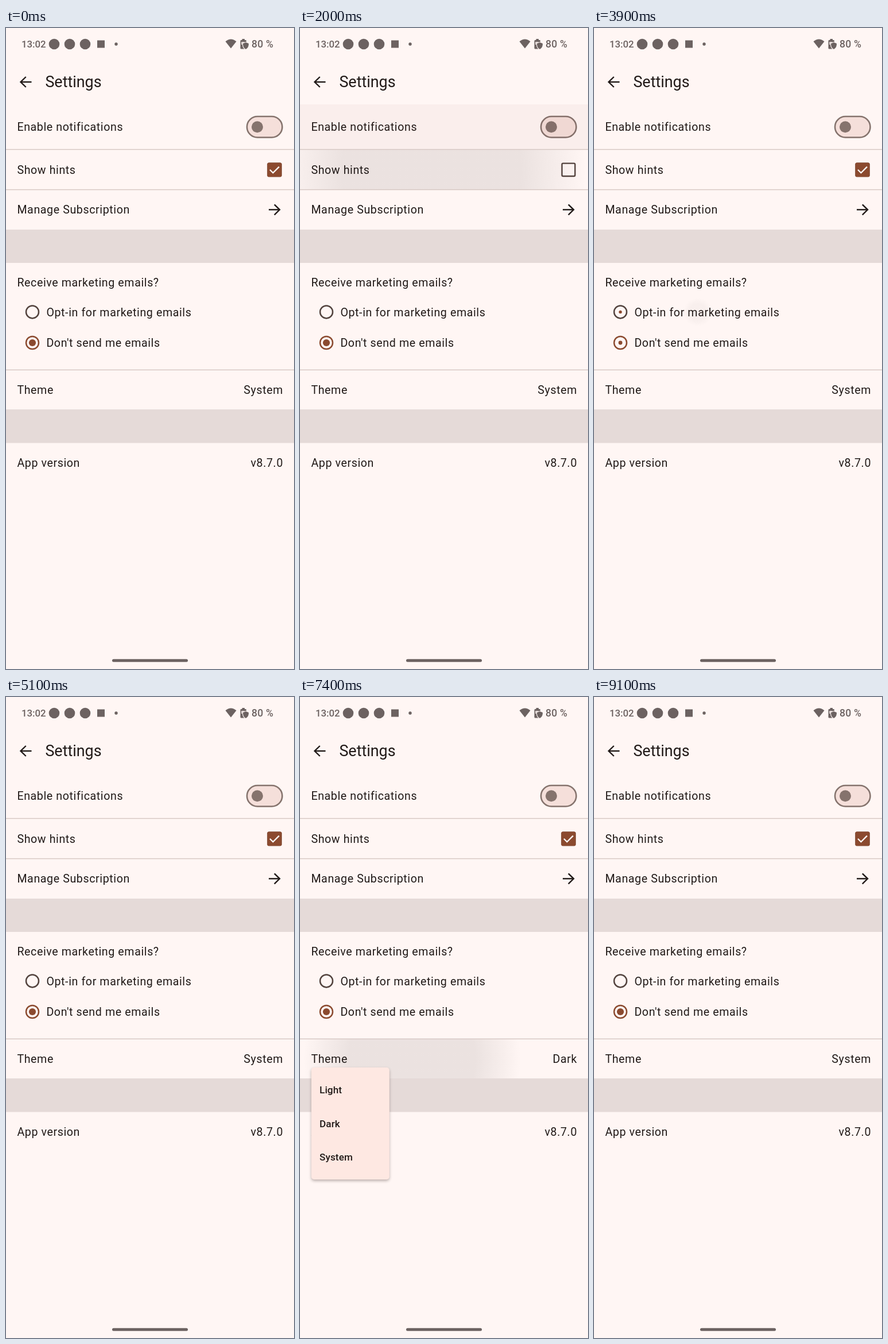
Write an HTML page with a canvas that moves like this. It is 502x1116 px and loops after 9200 ms.

```html
<!DOCTYPE html>
<html lang="en">
<head>
<meta charset="utf-8">
<title>Settings</title>
<style>
  html, body { margin: 0; width: 100%; height: 100%; overflow: hidden; background: #fff6f4; }
  canvas { display: block; width: 502px; height: 1116px; }
</style>
</head>
<body>
<canvas id="stage" width="502" height="1116"></canvas>
<script>
const ctx = document.getElementById('stage').getContext('2d');
const LOOP = 9200, STEP = 100, W = 502;
const BG = '#fff6f4', INK = '#211a18', PRIMARY = '#8b4a2f', OUTLINE = '#85736d',
      MUTED = '#53433e', STATUS = '#6c6261', BAND = '#e5dad8', LINE = '#d5c6c2';

// Rows as [top, height]
const ROW = {
  notify: [133, 78], hints: [212, 69], manage: [282, 69],
  optIn: [468, 53], optOut: [521, 53], theme: [596, 68]
};

// Touch ripples; "hold" freezes the spread at that age until "end"
const ripples = [
  { row: 'notify', start: 630, x: 150, end: 1000 },
  { row: 'notify', start: 1130, x: 150, end: 1600 },
  { row: 'hints', start: 1730, x: 130, end: 2200 },
  { row: 'hints', start: 2330, x: 130, end: 2800 },
  { row: 'manage', start: 2830, x: 130, end: 3300 },
  { row: 'optIn', start: 3875, x: 175, end: 4200 },
  { row: 'optOut', start: 4230, x: 175, end: 4700 },
  { row: 'theme', start: 5125, x: 120, end: 5600, hold: 190 },
  { row: 'theme', start: 6225, x: 120, end: 6700, hold: 190 },
  { row: 'theme', start: 7210, x: 120, end: 7700, hold: 290 },
  { row: 'theme', start: 8325, x: 120, end: 8700, hold: 190 }
];

// Menu visits as [open, close]
const menus = [[5200, 5800], [6300, 6600], [7300, 7700], [8400, 8700]];

const clamp = v => Math.max(0, Math.min(1, v));
const mix = (a, b, p) => a + (b - a) * p;
const ease = p => p * p * (3 - 2 * p);
const ramp = (t, from, len) => ease(clamp((t - from) / len));
// Rises shortly before "on" and falls shortly before "off"
const pulse = (t, on, off) => ramp(t, on - 60, 130) - ramp(t, off - 60, 130);

function text(str, x, y, o = {}) {
  ctx.font = `${o.weight || 400} ${o.size || 19.6}px Roboto, sans-serif`;
  ctx.letterSpacing = (o.gap ?? 0.61) + 'px';
  ctx.textAlign = o.align || 'left';
  ctx.fillStyle = o.color || INK;
  ctx.fillText(str, x, y);
}

function rect(x, y, w, h, color) {
  ctx.fillStyle = color;
  ctx.fillRect(x, y, w, h);
}

function round(x, y, w, h, r) {
  ctx.beginPath();
  ctx.roundRect(x, y, w, h, r);
}

function disc(x, y, r, color) {
  ctx.beginPath();
  ctx.arc(x, y, r, 0, Math.PI * 2);
  ctx.fillStyle = color;
  ctx.fill();
}

function stroke(points, color, width) {
  ctx.beginPath();
  points.forEach(([x, y]) => ctx.lineTo(x, y));
  ctx.strokeStyle = color;
  ctx.lineWidth = width;
  ctx.stroke();
}

function arrow(tip, y, dir) {
  stroke([[tip - dir * 1.5, y], [tip - dir * 19, y]], INK, 2.4);
  stroke([[tip - dir * 9.2, y - 9], [tip, y], [tip - dir * 9.2, y + 9]], INK, 2.4);
}

function statusBar() {
  text('13:02', 27, 33.5, { size: 16.8, weight: 500, gap: 0, color: STATUS });
  [84, 111, 138].forEach(x => disc(x, 28, 9.3, STATUS));
  rect(159, 21.5, 13, 13, STATUS);
  disc(192, 28, 2.7, STATUS);

  ctx.fillStyle = STATUS;
  ctx.beginPath();
  ctx.moveTo(392, 35.5);
  ctx.lineTo(382.5, 23.5);
  ctx.quadraticCurveTo(392, 15.5, 401.5, 23.5);
  ctx.fill();

  // Battery with a shield
  round(408.5, 21, 10.5, 15.5, 1.5);
  ctx.fill();
  rect(411.5, 19, 4.5, 3, STATUS);
  stroke([[411, 29], [411, 25], [415.5, 25]], BG, 1.4);
  ctx.beginPath();
  ctx.moveTo(418, 25);
  ctx.lineTo(423, 27);
  ctx.quadraticCurveTo(423.5, 34, 418, 37);
  ctx.quadraticCurveTo(412.5, 34, 413, 27);
  ctx.closePath();
  ctx.strokeStyle = BG;
  ctx.lineWidth = 2;
  ctx.stroke();
  ctx.fillStyle = STATUS;
  ctx.fill();

  text('80 %', 428, 33.5, { size: 17.6, weight: 500, gap: 0.2, color: STATUS });
}

function ripple(r, t) {
  if (t < r.start || t >= r.end) return;
  const age = Math.min(t - r.start, r.hold || 1e4);
  const [top, h] = ROW[r.row];
  const x = mix(r.x, W / 2, clamp(age / 330));
  const fade = r.hold ? 1 : 1 - ramp(age, 270, 190);
  const a = 0.09 * clamp(age / 75) * fade;
  const g = ctx.createRadialGradient(x, top + h / 2, 0, x, top + h / 2, age);
  g.addColorStop(0, `rgba(35,25,23,${a})`);
  g.addColorStop(0.58, `rgba(35,25,23,${a})`);
  g.addColorStop(1, 'rgba(35,25,23,0)');
  rect(0, top, W, h, g);
}

function toggle(p) {
  round(420, 154, 61.5, 36.5, 18.25);
  ctx.fillStyle = '#f5dfda';
  ctx.fill();
  ctx.strokeStyle = OUTLINE;
  ctx.lineWidth = 2.6;
  ctx.stroke();
  ctx.globalAlpha = p;
  round(418.7, 152.7, 64.1, 39.1, 19.5);
  ctx.fillStyle = PRIMARY;
  ctx.fill();
  ctx.globalAlpha = 1;
  disc(mix(438, 463, p), 172.2, mix(10, 14.6, p), p > 0.5 ? '#fff' : OUTLINE);
}

function checkbox(p) {
  round(456.6, 235.6, 22.8, 22.4, 2);
  ctx.strokeStyle = MUTED;
  ctx.lineWidth = 2.4;
  ctx.stroke();
  ctx.globalAlpha = p;
  round(455.4, 234.4, 25.2, 24.8, 2.8);
  ctx.fillStyle = PRIMARY;
  ctx.fill();
  stroke([[460, 246.8], [465.4, 252.2], [476, 241.6]], '#fff', 2.3);
  ctx.globalAlpha = 1;
}

function radio(y, p) {
  ctx.beginPath();
  ctx.arc(46, y, 11, 0, Math.PI * 2);
  ctx.strokeStyle = p > 0.5 ? PRIMARY : MUTED;
  ctx.lineWidth = 2.5;
  ctx.stroke();
  if (p > 0) disc(46, y, 6.1 * p, PRIMARY);
}

function menu(t) {
  const visit = menus.find(([open, close]) => t >= open && t <= close);
  if (!visit) return;
  const scale = mix(0.975, 1, clamp((t - visit[0]) / 100));
  ctx.save();
  ctx.globalAlpha = t === visit[1] ? 0.5 : 1;
  ctx.translate(87.8, 645);
  ctx.scale(scale, scale);
  ctx.translate(-87.8, -645);
  ctx.shadowColor = 'rgba(60,40,35,.35)';
  ctx.shadowBlur = 5;
  ctx.shadowOffsetY = 2.5;
  round(19.8, 645, 136, 195, 4.8);
  ctx.fillStyle = '#fee8e2';
  ctx.fill();
  ctx.shadowColor = 'transparent';
  ['Light', 'Dark', 'System'].forEach((s, i) =>
    text(s, 34, 690 + i * 58.6, { size: 17.1, weight: 500, gap: 0.12 }));
  ctx.restore();
}

function draw(t) {
  rect(0, 0, W, 1116, BG);
  statusBar();
  arrow(25.5, 94, -1);
  text('Settings', 68.4, 103.2, { size: 26.9, gap: 0 });

  rect(0, 351, W, 58, BAND);
  rect(0, 664, W, 58.5, BAND);
  ripples.forEach(r => ripple(r, t));
  if (t >= 8700 && t < 9100) rect(0, 596, W, 68, 'rgba(35,25,23,.02)');
  [210.8, 280.8, 594.6].forEach(y => rect(0, y, W, 1.4, LINE));

  text('Enable notifications', 19.4, 179.3);
  toggle(pulse(t, 700, 1200));
  if (t >= 1000 && t < 2200) rect(0, 133, W, 78, 'rgba(90,20,10,.03)');

  text('Show hints', 19.4, 253.5);
  checkbox(1 - pulse(t, 1800, 2400));

  text('Manage Subscription', 19.4, 323.3);
  arrow(477, 316.3, 1);

  const optIn = pulse(t, 3900, 4300);
  text('Receive marketing emails?', 19.4, 450.3);
  radio(494.4, optIn);
  text('Opt-in for marketing emails', 70.4, 501.5);
  radio(548, 1 - optIn);
  text("Don't send me emails", 70.4, 555);

  text('Theme', 19.4, 636.8);
  text(t >= 6700 && t < 7800 ? 'Dark' : 'System', 483, 636.8, { align: 'right' });
  text('App version', 19.4, 763.8);
  text('v8.7.0', 483, 763.8, { align: 'right' });

  menu(t);

  round(185, 1098.8, 132, 5, 2.5);
  ctx.fillStyle = STATUS;
  ctx.fill();
}

const begin = performance.now();
function tick() {
  const t = (performance.now() - begin) % LOOP;
  draw(Math.floor(t / STEP) * STEP);
  requestAnimationFrame(tick);
}
tick();
</script>
</body>
</html>
```
